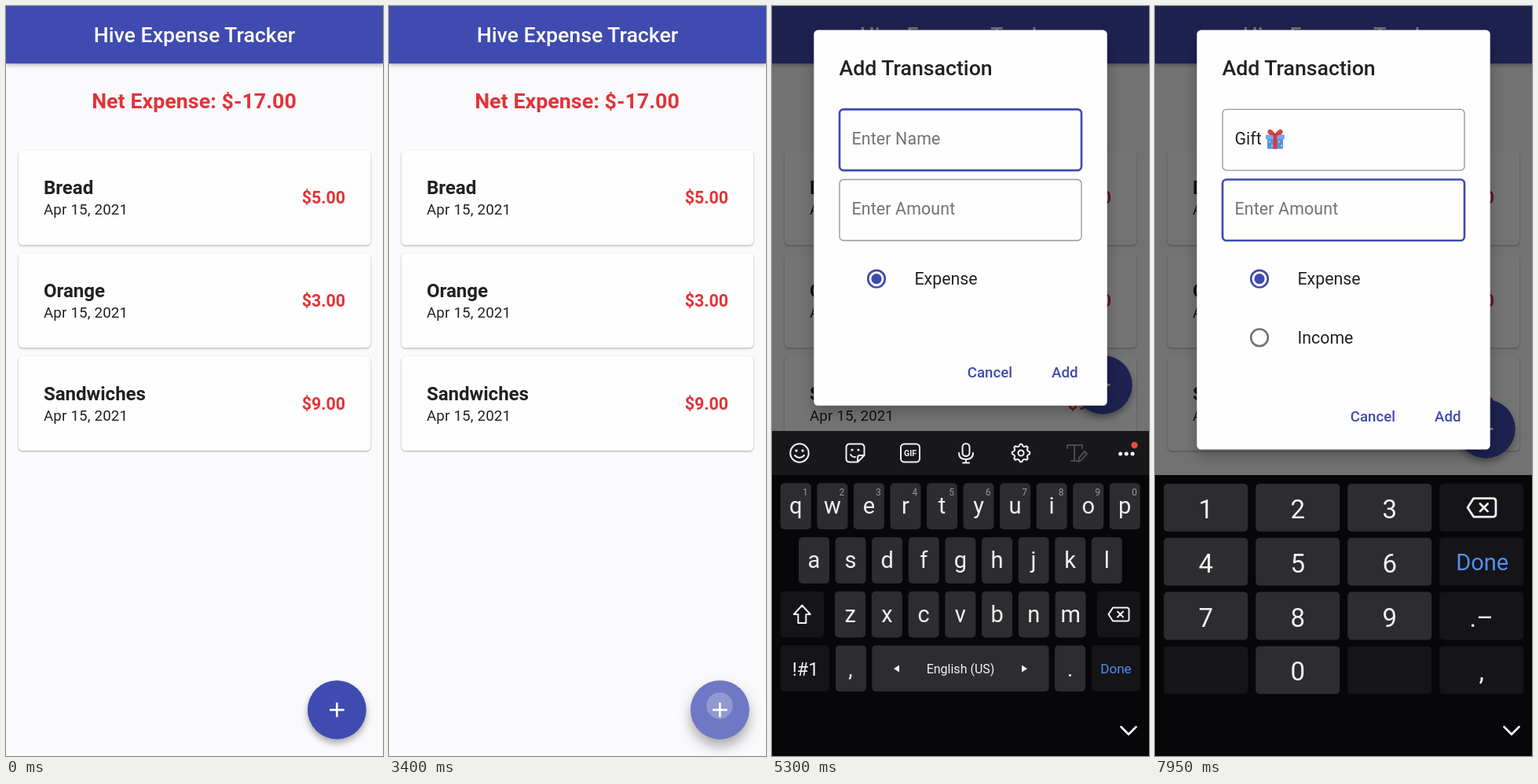
An HTML page that plays this animation: 480 px wide and 953 px high, repeating every 8 s.

```html
<!DOCTYPE html>
<html lang="en">
<head>
<meta charset="utf-8">
<title>Expense tracker</title>
<style>
html, body { margin: 0; width: 100%; height: 100%; overflow: hidden; background: #faf9fc; }
svg { display: block; width: 100vw; height: 100vh; font-family: Roboto, "Noto Sans", sans-serif; }
text { white-space: pre; }
.card { filter: drop-shadow(0 1.3px 1px rgba(0,0,0,.32)); }
.bar { filter: drop-shadow(0 2px 2.5px rgba(0,0,0,.3)); }
.pop { filter: drop-shadow(0 1px 1.2px rgba(0,0,0,.3)); }
.box { filter: drop-shadow(0 8px 9px rgba(0,0,0,.25)); }
.line { fill: none; stroke: #f2f2f4; stroke-width: 2; stroke-linecap: round; stroke-linejoin: round; }
</style>
</head>
<body>
<svg id="stage" viewBox="0 0 480 953" preserveAspectRatio="none"></svg>
<script>
const BLUE = '#3f4bb0', RED = '#e23338', INK = '#212124', WHITE = '#fffefe';
const KEY = '#2d2c2f', DARK = '#151417', LIGHT = '#f2f2f4', LINK = '#5290f2';

const rect = (x, y, w, h, r, fill, more = '') =>
  `<rect x="${x}" y="${y}" width="${w}" height="${h}" rx="${r}" fill="${fill}" ${more}/>`;
const text = (x, y, size, str, fill = INK, weight = 400, anchor = 'start', more = '') =>
  `<text x="${x}" y="${y}" font-size="${size}" fill="${fill}" font-weight="${weight}" text-anchor="${anchor}" ${more}>${str}</text>`;
const mid = (x, y, size, str, fill = LIGHT, weight = 400) => text(x, y, size, str, fill, weight, 'middle');
const circle = (x, y, r, fill, more = '') => `<circle cx="${x}" cy="${y}" r="${r}" fill="${fill}" ${more}/>`;
const line = (d, more = '') => `<path class="line" d="${d}" ${more}/>`;
const at = (x, y, body, scale = 1) => `<g transform="translate(${x} ${y}) scale(${scale})">${body}</g>`;
const group = (id, body, more = '') => `<g id="${id}" ${more}>${body}</g>`;

function card([name, price], i) {
  const y = 183.7 + i * 130.67;
  return rect(16, y, 448, 120, 5.3, WHITE, 'class="card"') +
    text(48, y + 55.5, 24, name, INK, 700) +
    text(48, y + 81.6, 18.67, 'Apr 15, 2021', INK, 400, 'start', 'letter-spacing=".2"') +
    text(432, y + 67.6, 21.33, price, RED, 700, 'end');
}

function glow(id) {
  return group(id, circle(0, 96.5 - 720, 720, BLUE), 'clip-path="url(#glowClip)"');
}

function field(id, y) {
  return `<rect id="${id}" x="86" y="${y}" width="308" height="77.5" rx="5" fill="none"/>`;
}

function radio(y, label, on) {
  const color = on ? BLUE : '#747477';
  return circle(133, y, 10.8, 'none', `stroke="${color}" stroke-width="2.67"`) +
    (on ? circle(133, y, 6.6, BLUE) : '') + text(181.5, y + 7.3, 21.33, label);
}

function gift() {
  return at(153, 169.5,
    rect(-10, -1, 20, 13, 1, '#5b8ee0') +
    rect(-12, -6, 24, 6, 1, '#76a8ee') +
    [-7, -4, 5, 8].map((x, i) => circle(x, 3 + i % 2 * 5, 1.2, '#a9cbf7')).join('') +
    rect(-2.4, -6, 4.8, 18, 0, '#d93a35') +
    '<path d="M0-6C-4-14-10-13-9-9S-4-6 0-6 8-5 9-9 4-14 0-6Z" fill="#e0443c" stroke="#b92c2c" stroke-width="1"/>');
}

function dialog() {
  return `<rect id="sheet" class="box" x="53.3" y="30.5" width="373.4" rx="5.3" fill="${WHITE}"/>` +
    text(85.5, 87.5, 26.67, 'Add Transaction', INK, 500) +
    `<g clip-path="url(#bodyClip)">` +
    field('nameBox', 131.3) + field('sumBox', 220.5) +
    group('hint', text(101.5, 176, 21.33, 'Enter Name', '#727275', 400, 'start', 'letter-spacing=".15"')) +
    group('entry', text(101.5, 176, 21.33, 'Gift') + gift()) +
    text(101.5, 265.3, 21.33, 'Enter Amount', '#727275', 400, 'start', 'letter-spacing=".15"') +
    `<rect id="caret" width="2.67" height="21" rx="1" fill="${BLUE}"/>` +
    radio(346.7, 'Expense', true) + radio(421.3, 'Income', false) + '</g>' +
    group('actions', text(248.8, 0, 18.67, 'Cancel', BLUE, 500) + text(356, 0, 18.67, 'Add', BLUE, 500));
}

const erase = line('M-13 0L-7.5-8.5H10.5Q13-8.5 13-6V6Q13 8.5 10.5 8.5H-7.5ZM-1.5-3.5L5.5 3.5M5.5-3.5L-1.5 3.5');

function gear() {
  const pts = [];
  for (let i = 0; i < 32; i++) {
    const a = (i - .5) * Math.PI / 16, r = i % 4 < 2 ? 11.3 : 9;
    pts.push((r * Math.cos(a)).toFixed(1) + ' ' + (r * Math.sin(a)).toFixed(1));
  }
  return line('M' + pts.join('L') + 'Z') + circle(0, 0, 3.6, 'none', 'class="line"');
}

function toolbar() {
  return at(35, 568, circle(0, 0, 11.7, 'none', 'class="line"') + circle(-4, -3, 1.7, LIGHT) +
      circle(4, -3, 1.7, LIGHT) + line('M-6 3Q0 9 6 3')) +
    at(106, 568, line('M3 11.5H-7Q-11.5 11.5-11.5 7V-7Q-11.5-11.5-7-11.5H7Q11.5-11.5 11.5-7V3L3 11.5V6Q3 3 6 3H11') +
      circle(-4, -4, 1.6, LIGHT) + circle(4, -4, 1.6, LIGHT) + line('M-6 2Q-3 6 0 5')) +
    at(176, 568, rect(-12, -11.5, 24, 23, 4.5, 'none', 'class="line"') + mid(0, 3.8, 10.5, 'GIF', LIGHT, 700)) +
    at(247, 568, rect(-4.5, -12, 9, 16, 4.5, 'none', 'class="line"') + line('M-9 0Q-9 8 0 8T9 0M0 8V12.5M-4 12.5H4')) +
    at(317, 568, gear()) +
    at(388, 568, line('M-12-6V-10H7V-6M-3-10V10M-7 10H0M2 11L3 6L10-2L13 1L6 9Z', 'style="stroke:#4b4b4e"')) +
    [443.5, 451.2, 459].map(x => circle(x, 569, 2.5, LIGHT)).join('') + circle(461.5, 558, 4.2, '#e5484a');
}

function row(letters, x, y, step) {
  return [...letters].map((c, i) => {
    const k = x + i * step;
    return rect(k - 19.5, y, 39, 58.7, 5, KEY) + mid(k, y + 39, 29, c);
  }).join('');
}

function letters() {
  const digits = [...'1234567890'].map((d, i) => mid(42.3 + i * 46.55, 622, 12, d, '#98989b')).join('');
  return rect(0, 540, 480, 500, 0, '#070609') + rect(0, 540, 480, 56, 0, '#18181b') + toolbar() +
    row('qwertyuiop', 30.3, 606.3, 46.55) + digits +
    row('asdfghjkl', 53.5, 675, 46.6) + row('zxcvbnm', 99.6, 743.7, 46.75) +
    rect(10.7, 743.7, 55.5, 58.7, 5, DARK) + at(38.3, 773, line('M0-11.5L10.5 0H5V11H-5V0H-10.5Z', 'stroke-width="2.4"')) +
    rect(414, 743.7, 55, 58.7, 5, DARK) + at(441.5, 773, erase) +
    rect(10.7, 812.4, 62.5, 58.7, 5, DARK) + mid(42.5, 850.5, 23.5, '!#1') +
    rect(81, 812.4, 39, 58.7, 5, KEY) + mid(100, 852, 27, ',') +
    rect(127.3, 812.4, 225.3, 58.7, 5, KEY) + mid(240, 848, 16, 'English (US)') +
    `<path d="M155 842L162 837.5V846.5ZM325 842L318 837.5V846.5Z" fill="${LIGHT}"/>` +
    rect(360, 812.4, 39, 58.7, 5, KEY) + mid(379.5, 852, 27, '.') +
    rect(407, 812.4, 62, 58.7, 5, DARK, 'id="done"') + mid(438, 848.3, 17, 'Done', LINK);
}

function numbers() {
  const labels = ['1', '2', '3', '', '4', '5', '6', 'Done', '7', '8', '9', '.–', '', '0', '', ','];
  return rect(0, 596, 480, 357, 0, '#070609') + labels.map((s, i) => {
    const x = 11.2 + i % 4 * 117, y = 607 + (i >> 2) * 68.8, digit = /\d/.test(s);
    const body = s === 'Done' ? mid(x + 54.5, y + 41.3, 29, s, LINK) : mid(x + 53.5, y + 44, 33, s);
    return rect(x, y, 107, 60.8, 5, digit ? KEY : DARK) + body;
  }).join('') + at(416, 637.3, erase, 1.38);
}

const items = [['Bread', '$5.00'], ['Orange', '$3.00'], ['Sandwiches', '$9.00']];
const fab = group('fab',
  group('disc', circle(421.3, 894.3, 37.4, BLUE)) +
  `<g clip-path="url(#fabClip)">` + circle(421.3, 894.3, 37.4, '#fff', 'id="tint"') +
  circle(421, 889, 0, '#fff', 'id="ripple"') + '</g>' +
  '<path d="M412 894.3H430.6M421.3 885V903.6" stroke="#fff" stroke-width="2.67"/>');

document.getElementById('stage').innerHTML =
  `<defs>
    <clipPath id="glowClip"><rect width="480" height="96.5"/></clipPath>
    <clipPath id="fabClip">${circle(421.3, 894.3, 37.4, '#fff')}</clipPath>
    <clipPath id="listClip"><rect id="listBox" y="168" width="480"/></clipPath>
    <clipPath id="bodyClip"><rect id="bodyBox" x="53" y="100" width="374"/></clipPath>
  </defs>` +
  rect(0, 0, 480, 953, 0, '#faf9fc') +
  text(239.5, 130.3, 26.67, 'Net Expense: $-17.00', RED, 700, 'middle', 'letter-spacing=".1"') +
  `<g clip-path="url(#listClip)">${items.map(card).join('')}${glow('low')}${glow('high')}</g>` +
  rect(0, -6, 480, 79, 0, BLUE, 'class="bar"') + mid(240, 46, 26.67, 'Hive Expense Tracker', WHITE, 500) +
  fab + rect(0, 0, 480, 953, 0, '#000', 'id="shade"') + group('dialog', dialog()) +
  group('handle', `<path d="M101.5 180.2L111.9 190.6A14.67 14.67 0 1 1 91.1 190.6Z" fill="${BLUE}"/>`) +
  group('paste', rect(58.5, 87, 86, 58.5, 9, WHITE, 'class="pop"') + mid(101.3, 122.5, 18.67, 'Paste', INK, 500)) +
  group('letters', letters()) + group('numbers', numbers()) +
  line('M444.5 916L454 925.5L463.5 916', 'id="chevron" style="stroke-width:2.7"');

const el = {};
document.querySelectorAll('[id]').forEach(e => el[e.id] = e);
const set = (id, attrs) => { for (const k in attrs) el[id].setAttribute(k, attrs[k]); };
const show = (id, on) => set(id, { opacity: +on });
const part = (t, a, b) => Math.min(1, Math.max(0, (t - a) / (b - a)));
const out = (p, n = 2) => 1 - (1 - p) ** n;
const mix = (a, b, p) => a + (b - a) * p;

// Edge glow: swells while pulled, then recedes
function pull(id, t, [start, peak, end], size, x, y, dir) {
  const s = size * out(part(t, start, peak), 3) * (1 - part(t, peak, end)) ** 2;
  set(id, { transform: `translate(${x} ${y}) scale(1 ${dir * s})`, opacity: Math.min(.2, s * .34) });
  el[id].firstChild.setAttribute('cx', 0);
}

const OPEN = 3650, KEYS = 4400, TAP = 5800, PASTE = 6450, NEXT = 7080;

function draw(t) {
  pull('low', t, [500, 900, 1500], .68, 0, 953, -1);
  pull('high', t, [1500, 1710, 2310], .61, 0, 168, 1);
  el.low.firstChild.setAttribute('cx', 281);
  el.high.firstChild.setAttribute('cx', 268);

  // Floating button
  const floor = t < KEYS ? 953 : t < NEXT ? 540 : 596;
  const held = part(t, 3200, 3350) * (1 - part(t, 3600, 3800));
  set('fab', { transform: `translate(0 ${floor - 953})` });
  el.disc.style.filter = `drop-shadow(0 ${mix(5, 9, held)}px ${mix(4.5, 8, held)}px rgba(0,0,0,.32))`;
  set('tint', { opacity: .25 * held });
  set('ripple', {
    r: t < 3200 ? 0 : t < 3520 ? mix(8, 22, part(t, 3200, 3520)) : mix(22, 50, part(t, 3520, 3720)),
    opacity: .24 * part(t, 3200, 3300) * (1 - part(t, 3560, 3780))
  });
  set('listBox', { height: floor - 168 });

  // Dialog
  const fade = out(part(t, OPEN, OPEN + 150));
  const lift = out(part(t, KEYS, KEYS + 100)), grow = out(part(t, NEXT, NEXT + 100));
  const height = mix(mix(545.6, 477.2, lift), 533, grow);
  set('shade', { opacity: .54 * fade });
  set('dialog', { opacity: fade, transform: `translate(0 ${mix(172.5, 0, lift)})` });
  set('sheet', { height });
  set('bodyBox', { height: height - 186.5 });
  set('actions', { transform: `translate(0 ${height - 5.2})` });

  const second = t >= NEXT, filled = t >= PASTE;
  const focus = on => ({ stroke: on ? BLUE : '#969699', 'stroke-width': on ? 2.67 : 1.33 });
  set('nameBox', focus(!second));
  set('sumBox', focus(second));
  show('hint', !filled);
  show('entry', filled);

  const since = t - (second ? NEXT : filled ? PASTE : t >= TAP ? TAP : OPEN);
  set('caret', { x: filled && !second ? 167.5 : 101, y: second ? 247.5 : 158 });
  show('caret', since % 1000 < 500);
  show('handle', t >= TAP && !filled);
  set('paste', { opacity: part(t, 5900, 6050) * (1 - part(t, PASTE - 50, PASTE + 50)) });

  // Keyboards
  set('letters', { transform: `translate(0 ${413 * (1 - out(part(t, KEYS, KEYS + 370), 3))})` });
  show('letters', t >= KEYS && !second);
  show('numbers', second);
  set('done', { fill: t >= 6880 ? '#3a393d' : DARK });
  set('chevron', { opacity: part(t, KEYS, KEYS + 480) });
}

function frame() {
  draw(performance.now() % 8000);
  requestAnimationFrame(frame);
}
frame();
</script>
</body>
</html>
```
